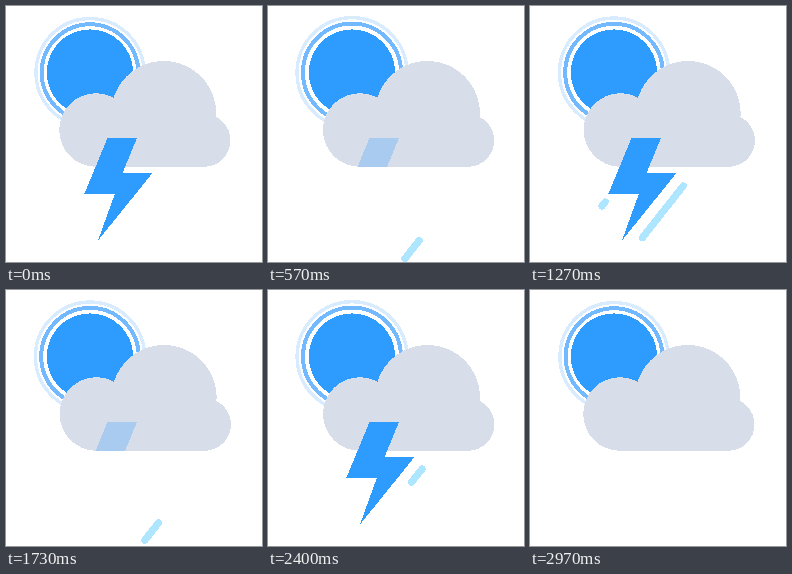
Recreate the animation shown at these times as an HTML page. Size 256x256 px, loop 3010 ms.

```html
<!DOCTYPE html>
<html lang="en">
<head>
<meta charset="utf-8">
<title>Thunderstorm</title>
<style>
html, body { margin: 0; width: 100%; height: 100%; overflow: hidden; background: #fff; }
svg { display: block; width: 100vw; height: 100vh; }
</style>
</head>
<body>
<svg viewBox="0 0 256 256" shape-rendering="crispEdges">
  <g fill="none">
    <circle id="outer" cx="84" cy="66.6" stroke="#d9ebfe" stroke-width="3.4"/>
    <circle id="inner" cx="84" cy="66.6" stroke="#72b9ff" stroke-width="4"/>
  </g>
  <circle cx="84" cy="66.6" r="43.2" fill="#2e9cff"/>
  <g id="cloud" fill="#d8dee9">
    <circle cx="90" cy="124" r="36.8"/>
    <circle cx="157.7" cy="107.5" r="52.5"/>
    <circle cx="198.2" cy="134.5" r="26.3"/>
    <path d="M90 100H157L198 120V160.7H90Z"/>
  </g>
  <g id="drops" stroke="#aee5ff" stroke-width="7.2" stroke-linecap="round">
    <line/><line/><line/><line/>
  </g>
  <g fill="#2e9cff">
    <path id="boltTop" d="M101.500 132H131L119 161H89.500Z"/>
    <path id="boltTip" d="M89.500 161H119L116.500 167H146.500L92 234.500L109 187.500H78.500Z"/>
  </g>
</svg>
<script>
const LOOP = 3010, STRIKE = 1182;
const $ = id => document.getElementById(id);
const lines = $('drops').children;

// Linear interpolation through [time, value] pairs
function track(keys, t) {
  const i = keys.findIndex(k => k[0] > t);
  if (i < 0) return keys[keys.length - 1][1];
  if (!i) return keys[0][1];
  const [t0, a] = keys[i - 1], [t1, b] = keys[i];
  return a + (b - a) * (t - t0) / (t1 - t0);
}

const flash = [[0, 1], [100, 1], [265, .72], [540, .28], [575, .28], [600, 0], [1140, 0], [1165, 1]];

// Each drop: top point, visible time span, tracks for head and tail along its path
const drops = [
  { x: 154, y: 179, on: 20, off: 240, tail: [[87, 0], [240, 100]], head: [[20, 0], [87, 66], [240, 150]] },
  { x: 76, y: 195, on: 40, off: 200, tail: [[87, 0], [200, 75]], head: [[40, 0], [87, 5], [200, 90]] },
  { x: 159.5, y: 224, on: 170, off: 598, tail: [[170, -8], [265, 0], [545, 11], [575, 14], [598, 17]],
    head: [[170, 0], [265, 21], [545, 33], [575, 37], [598, 42]] },
  { x: 164, y: 194, on: 170, off: 300, tail: [[170, 0], [265, 78], [300, 100]], head: [[170, 20], [265, 100], [300, 125]] }
];

const wave = (t, period) => (1 - Math.cos(2 * Math.PI * t / period)) / 2;

function draw(now) {
  const t = now % LOOP, s = t % STRIKE;

  const pulse = wave(t, LOOP / 3);
  $('outer').setAttribute('r', 54 + pulse);
  $('inner').setAttribute('r', 48.3 + pulse * .8);
  $('cloud').setAttribute('transform', `translate(${2 * wave(t, LOOP / 2)})`);

  const glow = track(flash, s);
  $('boltTop').setAttribute('opacity', glow);
  $('boltTip').setAttribute('opacity', glow < .5 ? 0 : 1);

  drops.forEach((d, i) => {
    const line = lines[i];
    const set = (n, along) => {
      line.setAttribute('x' + n, d.x - .62 * along);
      line.setAttribute('y' + n, d.y + .785 * along);
    };
    set(1, track(d.tail, s));
    set(2, track(d.head, s));
    line.setAttribute('visibility', s >= d.on && s < d.off ? 'visible' : 'hidden');
  });
}

const start = performance.now();
(function tick() {
  draw(performance.now() - start);
  requestAnimationFrame(tick);
})();
</script>
</body>
</html>
```
